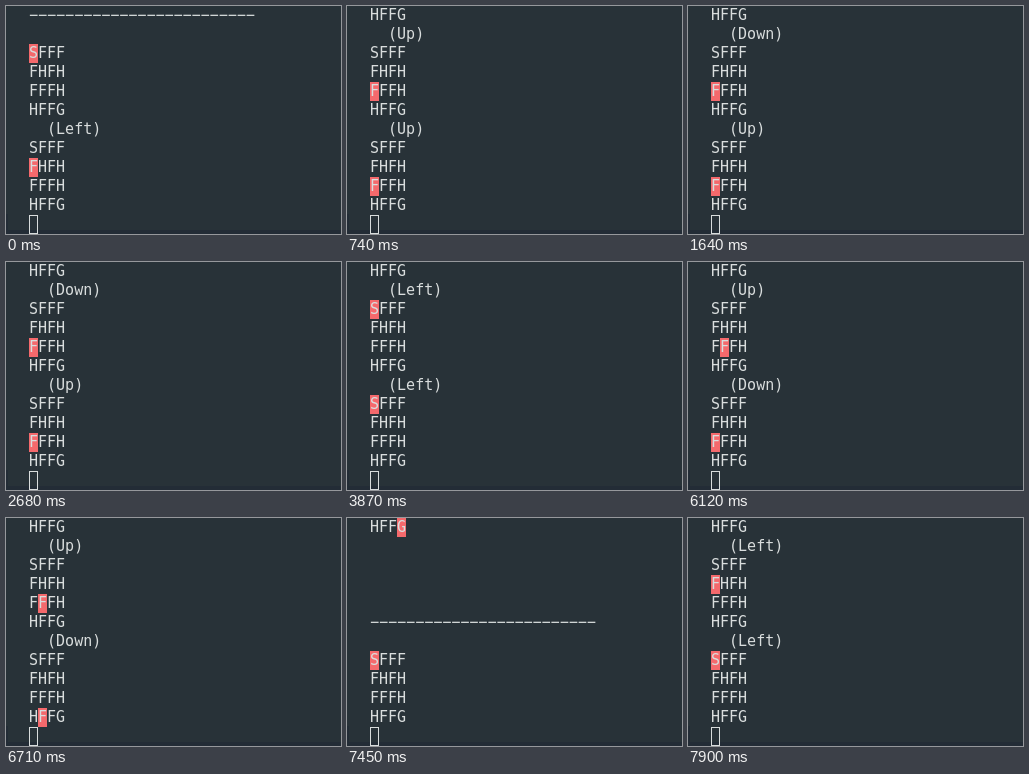
These frames come from a looping animation (335x228 px, 8000 ms). An HTML page:

```html
<!DOCTYPE html>
<html lang="en">
<head>
<meta charset="utf-8">
<title>Grid walk in a terminal</title>
<style>
  html, body { margin: 0; width: 100%; height: 100%; overflow: hidden; background: #283238; }
  svg { display: block; width: 335px; height: 228px; }
  text { font: 15px "DejaVu Sans Mono", "Liberation Mono", monospace; fill: #d9dddd; white-space: pre; }
  .hot { fill: #f4696c; }
  .edge { fill: #232c36; }
  .cursor { fill: none; stroke: #d9dddd; }
</style>
</head>
<body>
<svg viewBox="0 0 335 228">
  <rect width="335" height="228" fill="#283238"/>
  <rect class="edge" y="224" width="335" height="4"/>
  <rect class="edge" y="208" width="2" height="20"/>
  <g id="screen"></g>
  <rect class="cursor" x="23.5" y="209.5" width="8" height="18"/>
</svg>
<script>
const LOOP = 8000, ROWS = 11, LEFT = 23, CELL = 9, LINE = 19, BASELINE = 14;
const MAP = ["SFFF", "FHFH", "FFFH", "HFFG"];
const RULE = "\u2212".repeat(25);

// Each move: time, action, resulting cell (row * 4 + column).
const MOVES = [
  [0, "Left", 4], [150, "Left", 8], [450, "Up", 8], [740, "Up", 8], [1190, "Up", 9],
  [1490, "Down", 8], [1640, "Up", 8], [1940, "Up", 8], [2230, "Up", 9], [2380, "Down", 8],
  [2680, "Up", 8], [2980, "Up", 8], [3130, "Up", 4], [3430, "Left", 4], [3720, "Left", 0],
  [3870, "Left", 0], [5370, "Left", 4], [5670, "Left", 8], [5970, "Up", 9], [6120, "Down", 8],
  [6410, "Up", 9], [6710, "Down", 13], [7010, "Right", 14], [7150, "Down", 15],
  [7450, "reset", 0], [7750, "Left", 4], [7900, "Left", 0]
];

const plain = text => ({ text, hot: -1 });
const board = cell => MAP.map((text, row) => ({ text, hot: cell >> 2 === row ? cell & 3 : -1 }));
const opening = () => [plain(RULE), plain(""), ...board(0)];

const log = opening();
const views = MOVES.map(([time, action, cell]) => {
  if (action === "reset") log.push(...Array(4).fill(plain("")), ...opening());
  else log.push(plain(`  (${action})`), ...board(cell));
  return { time, lines: log.slice(-ROWS) };
});

const NS = "http://www.w3.org/2000/svg";
const screen = document.getElementById("screen");

function add(tag, attrs) {
  const node = document.createElementNS(NS, tag);
  for (const key in attrs) node.setAttribute(key, attrs[key]);
  return screen.appendChild(node);
}

const rows = Array.from({ length: ROWS }, (_, row) => ({
  mark: add("rect", { class: "hot", y: row * LINE, width: CELL, height: LINE }),
  label: add("text", { x: LEFT, y: row * LINE + BASELINE })
}));

let shown = null;

function draw(time) {
  const view = views.findLast(v => v.time <= time);
  if (view === shown) return;
  shown = view;
  rows.forEach(({ mark, label }, row) => {
    const { text, hot } = view.lines[row];
    label.textContent = text;
    mark.setAttribute("x", LEFT + hot * CELL);
    mark.setAttribute("visibility", hot < 0 ? "hidden" : "visible");
  });
}

const start = performance.now();
function tick() {
  draw((performance.now() - start) % LOOP);
  requestAnimationFrame(tick);
}
tick();
</script>
</body>
</html>
```
